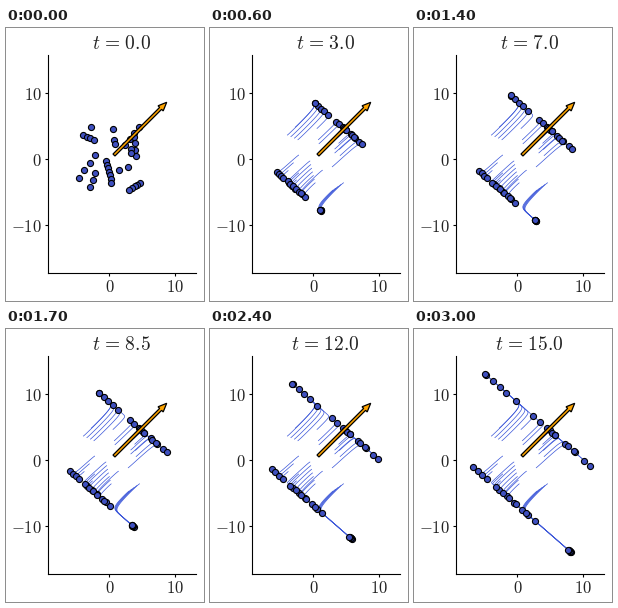
Write a matplotlib script that moves like this. It is 198 px wide and 273 px high and loops after 3.1 s.

```python
import matplotlib.pyplot as plt
import numpy as np
from matplotlib.animation import FuncAnimation
from matplotlib.collections import LineCollection

plt.rcParams["mathtext.fontset"] = "cm"

W, H, DPI = 198, 273, 100
SCALE = 6.6            # pixels per data unit
FRAMES, DT, SUB = 31, 0.5, 10
SLOPE = 0.872          # the lines fall along (1, -SLOPE)
PULL, SPREAD = 1.6, 0.067

# strings of points: first end, last end, count
STRINGS = [
    ((-4.0, 3.6), (-2.4, 2.9), 4),
    ((-2.8, 4.8), (0.5, 4.6), 2),
    ((0.7, 2.9), (0.8, 2.3), 2),
    ((4.4, 4.9), (2.4, 2.1), 4),
    ((3.7, 3.3), (4.0, 0.5), 4),
    ((3.2, 1.5), (3.2, 0.9), 2),
    ((-2.2, 0.6), (-4.6, -2.9), 4),
    ((-2.2, -2.1), (-2.9, -4.2), 3),
    ((-0.5, -0.3), (0.3, -3.6), 7),
    ((1.4, -1.7), (2.8, -1.2), 2),
    ((4.6, -3.6), (3.0, -4.7), 5),
]


def trajectories(start, t):
    """Positions of all points at times t, shape (points, times, 2)."""
    x, y = start.T
    u = (x - y) / (1 + SLOPE)
    v = x - u
    top = (v > 0) & (u < 3)
    hi, lo = np.argmax(v), np.argmin(v)
    u_lead = np.where(top, u[hi], u[lo])
    v_lead = np.where(top, v[hi], v[lo])
    far = np.clip(1 - v / v_lead, 0, 1)
    drift = np.where(top, 0.2, -0.3) * far

    # pulled to the leader's line after a short delay
    delay = (0.5 * far + 0.01)[:, None]
    pulled = t - delay * (1 - np.exp(-t / delay))
    vt = v_lead[:, None] + (v - v_lead)[:, None] * np.exp(-PULL * pulled)

    # spreading away from the leader along the line
    ease = 1 - np.exp(-t)
    gap = (u - u_lead)[:, None] + drift[:, None] * ease
    ut = u_lead[:, None] + gap * np.exp(SPREAD * (t - ease))
    return np.stack([vt + ut, vt - SLOPE * ut], axis=-1)


start = np.concatenate([np.linspace(a, b, n) for a, b, n in STRINGS])
times = np.arange((FRAMES - 1) * SUB + 1) * DT / SUB
paths = trajectories(start, times)

fig = plt.figure(figsize=(W / DPI, H / DPI), dpi=DPI, facecolor="white")
left, bottom, width, height = 41.5, 28.5, 148.5, 218
ax = fig.add_axes([left / W, bottom / H, width / W, height / H])
xmin, ymin = -9.39, -17.2
ax.set(xlim=(xmin, xmin + width / SCALE), ylim=(ymin, ymin + height / SCALE))
ax.spines[["top", "right"]].set_visible(False)
ax.set_xticks([0, 10], ["$0$", "$10$"])
ax.set_yticks([-10, 0, 10], ["$-10$", "$0$", "$10$"])
ax.tick_params(length=2, pad=2, labelsize=12, labelcolor="#222222")
title = ax.set_title("", fontsize=14, pad=4, color="#222222")

trails = LineCollection([], colors="#3a55d9", linewidths=0.5, zorder=1.5)
ax.add_collection(trails, autolim=False)
dots, = ax.plot([], [], "o", ms=4.4, mfc="#3f50c0", mec="black", mew=0.8,
                zorder=2, clip_on=False)
ax.arrow(0.68, 0.6, 7.99, 7.99, width=0.42, head_width=1.1, head_length=1.3,
         length_includes_head=True, fc="orange", ec="black", lw=0.9, zorder=3)


def draw(i):
    n = i * SUB
    trails.set_segments(list(paths[:, :n + 1]) if n else [])
    dots.set_data(paths[:, n, 0], paths[:, n, 1])
    title.set_text(rf"$t\hspace{{0.116}}=\hspace{{0.116}}{i * DT:.1f}$")
    return trails, dots, title


anim = FuncAnimation(fig, draw, frames=FRAMES, interval=100, repeat=True,
                     repeat_delay=0)
plt.show()
```
